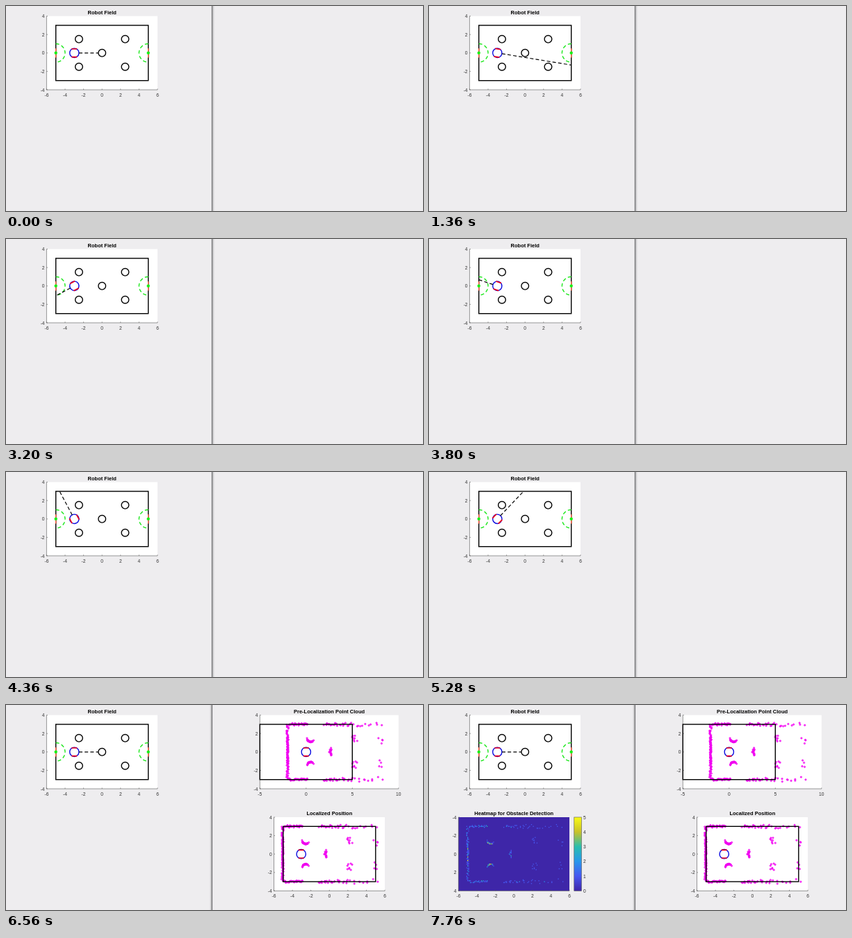
Recreate the animation shown at these times as an HTML page. Size 600x296 px, loop 7960 ms.

```html
<!DOCTYPE html>
<html lang="en">
<head>
<meta charset="utf-8">
<title>Robot localization</title>
<style>
  html, body { margin: 0; width: 100%; height: 100%; overflow: hidden; background: #eeedef; }
  svg { display: block; width: 100%; height: 100%; }
  text { font-family: "Liberation Sans", Arial, sans-serif; font-size: 6.7px; fill: #333; }
  .title { font-size: 7.5px; font-weight: bold; fill: #000; text-anchor: middle; }
  .axis { fill: none; stroke: #555; stroke-width: .6; }
  .line { fill: none; stroke: #000; stroke-width: 1.4; }
  .body { fill: none; stroke: #0a0ae0; stroke-width: 1.4; }
  .wheel { fill: none; stroke: #f00018; stroke-width: 1.7; }
  .area { fill: none; stroke: #1fe81f; stroke-width: 1.4; stroke-dasharray: 5 3.4; }
  .goal { stroke: #ff5a3c; stroke-width: 1.4; }
  .ball { fill: #18f018; }
  .ray { stroke: #000; stroke-width: 1.2; stroke-dasharray: 5 3.2; }
  .cloud { fill: #ff00ff; fill-opacity: .6; stroke: #f000f0; stroke-width: .9; }
</style>
</head>
<body>
<svg viewBox="0 0 600 296" preserveAspectRatio="none">
  <defs>
    <linearGradient id="parula" x1="0" y1="1" x2="0" y2="0"></linearGradient>
    <linearGradient id="shadeRight"><stop stop-color="#b4b4b6"/><stop offset="1" stop-color="#eeedef"/></linearGradient>
    <linearGradient id="shadeLeft"><stop stop-color="#eeedef"/><stop offset="1" stop-color="#b4b4b6"/></linearGradient>
  </defs>
  <rect width="600" height="296" fill="#eeedef"/>
  <rect id="leftFocus" x="297" width="3" height="296" fill="url(#shadeRight)"/>
  <rect id="rightFocus" x="293" width="3" height="296" fill="url(#shadeLeft)"/>
  <rect x="295.8" width="1.3" height="296" fill="#77777a"/>
</svg>
<script>
const LOOP = 7960, STEP = 40, SPIN_START = 1240, SPIN_END = 5880;
const UNIT = 13.3, TAU = Math.PI * 2;
const ROBOT_X = -3;
const CIRCLES = [[0, 0], [-2.5, -1.5], [-2.5, 1.5], [2.5, -1.5], [2.5, 1.5]];
const CIRCLE_R = 0.4, ROBOT_R = 0.5;
const PARULA = ['#3e26a8', '#4757f0', '#2797eb', '#29beae', '#c8c129', '#f9fb15'];
const svg = document.querySelector('svg');

function add(parent, tag, attrs, label) {
  const el = document.createElementNS(svg.namespaceURI, tag);
  for (const key in attrs) el.setAttribute(key, attrs[key]);
  if (label !== undefined) el.textContent = label;
  parent.append(el);
  return el;
}

const range = (from, to, step) =>
  Array.from({ length: Math.round((to - from) / step) + 1 }, (_, i) => from + i * step);

// Axes with their origin at (cx, cy); y runs from -4 to 4.
function plot({ cx, cy, from, to, step, title, back = '#fff', flip = false }) {
  const g = add(svg, 'g', {});
  const left = cx + from * UNIT, right = cx + to * UNIT;
  const top = cy - 4 * UNIT, bottom = cy + 4 * UNIT;
  add(g, 'rect', { x: left, y: top, width: right - left, height: bottom - top, fill: back });
  let path = `M${left} ${top}V${bottom}H${right}`;
  for (const v of range(from, to, step)) {
    const x = cx + v * UNIT;
    path += `M${x} ${bottom}v-1.6`;
    add(g, 'text', { x, y: bottom + 9.6, 'text-anchor': 'middle' }, v);
  }
  for (const v of range(-4, 4, 2)) {
    const y = cy + v * UNIT;
    path += `M${left} ${y}h1.6`;
    add(g, 'text', { x: left - 2.8, y: y + 2.5, 'text-anchor': 'end' }, flip ? v : -v || 0);
  }
  add(g, 'path', { class: 'axis', d: path });
  add(g, 'text', { class: 'title', x: (left + right) / 2, y: top - 2.8 }, title);
  g.origin = { x: cx, y: cy };
  return g;
}

const inPlot = g => add(g, 'g', { transform: `translate(${g.origin.x} ${g.origin.y})` });

function drawBorder(g) {
  add(g, 'rect', { class: 'line', x: -5 * UNIT, y: -3 * UNIT, width: 10 * UNIT, height: 6 * UNIT });
}

function drawRobot(g, x) {
  const robot = add(g, 'g', { transform: `translate(${x * UNIT} 0)` });
  const turn = add(robot, 'g', {});
  add(turn, 'circle', { class: 'body', r: ROBOT_R * UNIT });
  add(turn, 'path', { class: 'wheel', d: 'M-4 -5.8H4M-4 5.8H4' });
  return turn;
}

// Distance from the robot to the nearest wall or circle.
function cast(angle) {
  const c = Math.cos(angle), s = Math.sin(angle);
  let d = Math.min((c > 0 ? 8 : -2) / c, 3 / Math.abs(s));
  for (const [x, y] of CIRCLES) {
    const dx = x - ROBOT_X, b = dx * c + y * s;
    const disc = b * b - dx * dx - y * y + CIRCLE_R ** 2;
    if (b > 0 && disc > 0) d = Math.min(d, b - Math.sqrt(disc));
  }
  return d;
}

let seed = 20;
const random = () => (seed = seed * 16807 % 2147483647) / 2147483647;

// Noisy scan relative to the robot.
const scan = range(0, 359, 1).map(deg => {
  const a = deg * TAU / 360, d = cast(a);
  const noise = () => (random() - 0.5) * 0.075 * d;
  return [d * Math.cos(a) + noise(), d * Math.sin(a) + noise()];
});

function drawCloud(g, shift) {
  const d = scan.map(([x, y]) =>
    `M${((x + shift) * UNIT - 1.1).toFixed(2)} ${(y * UNIT).toFixed(2)}a1.1 1.1 0 1 0 2.2 0a1.1 1.1 0 1 0 -2.2 0`);
  add(g, 'path', { class: 'cloud', d: d.join('') });
}

function drawHeatmap(g) {
  const cell = 0.1, counts = new Map();
  for (const [x, y] of scan) {
    const key = [Math.round((x + ROBOT_X) / cell), Math.round(y / cell)].join();
    counts.set(key, (counts.get(key) || 0) + 1);
  }
  const size = cell * UNIT;
  for (const [key, n] of counts) {
    const [i, j] = key.split(',');
    add(g, 'rect', { x: (i - 0.5) * size, y: (j - 0.5) * size, width: size, height: size,
      fill: PARULA[Math.min(n, 5)] });
  }
}

// Field with the sweeping ray
const field = inPlot(plot({ cx: 138.2, cy: 67.8, from: -6, to: 6, step: 2, title: 'Robot Field' }));
drawBorder(field);
for (const [x, y] of CIRCLES)
  add(field, 'circle', { class: 'line', cx: x * UNIT, cy: y * UNIT, r: CIRCLE_R * UNIT });
for (const side of [-1, 1]) {
  const x = side * 5 * UNIT;
  add(field, 'path', { class: 'area', d: `M${x} ${-UNIT}A${UNIT} ${UNIT} 0 0 ${side < 0 ? 1 : 0} ${x} ${UNIT}` });
  add(field, 'path', { class: 'goal', d: `M${x} ${-UNIT / 2}V${UNIT / 2}` });
  add(field, 'circle', { class: 'ball', cx: x, cy: 0, r: 2.2 });
}
const robot = drawRobot(field, ROBOT_X);
const ray = add(robot, 'line', { class: 'ray', x1: ROBOT_R * UNIT });

// Raw and localized scans
const raw = plot({ cx: 431.8, cy: 67.8, from: -5, to: 10, step: 5, title: 'Pre-Localization Point Cloud' });
const located = plot({ cx: 465.3, cy: 215.2, from: -6, to: 6, step: 2, title: 'Localized Position' });
for (const [g, x] of [[raw, 0], [located, -3.05]]) {
  const area = inPlot(g);
  drawCloud(area, x);
  drawBorder(area);
  drawRobot(area, x);
}

// Heatmap and colour bar
const heat = plot({ cx: 122.2, cy: 215.2, from: -6, to: 6, step: 2, flip: true,
  title: 'Heatmap for Obstacle Detection', back: PARULA[0] });
drawHeatmap(inPlot(heat));
PARULA.forEach((color, i) =>
  add(document.getElementById('parula'), 'stop', { offset: i / 5, 'stop-color': color }));
const bar = add(svg, 'g', {});
add(bar, 'rect', { class: 'axis', x: 208.8, y: 162, width: 10.6, height: 106.4, style: 'fill:url(#parula)' });
for (const v of range(0, 5, 1))
  add(bar, 'text', { x: 222, y: 270.9 - v * 21.28 }, v);

const show = (el, on) => el.setAttribute('visibility', on ? 'visible' : 'hidden');

function render() {
  const t = Math.floor(performance.now() % LOOP / STEP) * STEP;
  const turn = Math.min(1, Math.max(0, (t - SPIN_START) / (SPIN_END - SPIN_START)));
  robot.setAttribute('transform', `rotate(${turn * 360})`);
  ray.setAttribute('x2', cast(turn * TAU) * UNIT);
  show(document.getElementById('leftFocus'), t < SPIN_END);
  show(document.getElementById('rightFocus'), t >= 6480);
  show(raw, t >= 6480);
  show(located, t >= 6560);
  show(heat, t >= 6960);
  show(bar, t >= 7000);
  requestAnimationFrame(render);
}
render();
</script>
</body>
</html>
```
